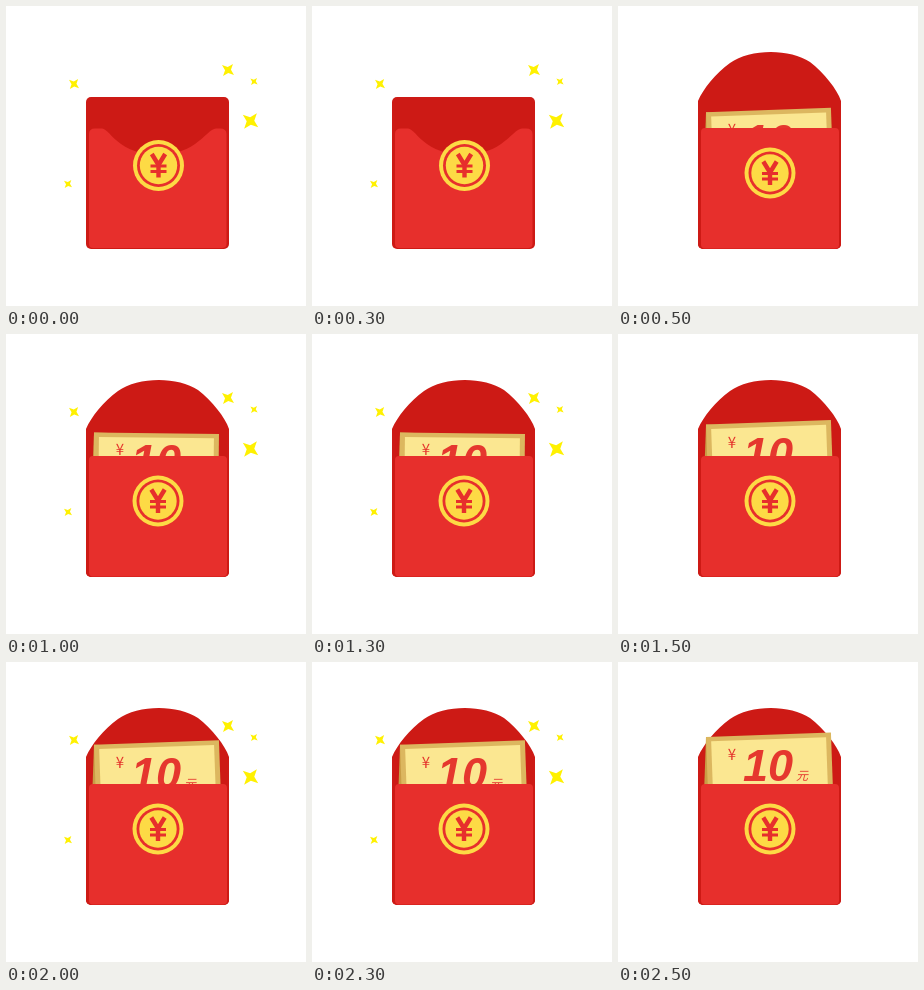
An HTML page with a canvas for the animation above (3 s loop, 300x300 px).

```html
<!DOCTYPE html>
<html>
<head>
<meta charset="utf-8">
<style>
  html, body { margin: 0; width: 100%; height: 100%; overflow: hidden; background: #fff; }
  canvas { display: block; }
</style>
</head>
<body>
<canvas id="stage" width="300" height="300"></canvas>
<script>
const ctx = document.getElementById('stage').getContext('2d');
const LOOP = 3000, STEP = 500;
const DARK = '#cd1a15', RED = '#e72f2c', GOLD = '#fdda45';
const SPARKLES = [[68, 78, 6.5], [222, 64, 7.8], [248, 75.5, 4.7], [244.5, 115, 10], [62, 178, 5.2]];

function fillRound(x, y, w, h, radius, color) {
  ctx.fillStyle = color;
  ctx.beginPath();
  ctx.roundRect(x, y, w, h, radius);
  ctx.fill();
}

function disc(x, y, r, color) {
  ctx.fillStyle = color;
  ctx.beginPath();
  ctx.arc(x, y, r, 0, Math.PI * 2);
  ctx.fill();
}

function label(text, x, y, font) {
  ctx.font = font;
  ctx.fillText(text, x, y);
}

function sparkle(x, y, r) {
  ctx.fillStyle = '#fff100';
  ctx.beginPath();
  for (let i = 0; i < 8; i++) {
    const angle = Math.PI * (i / 4 + 0.22);
    const reach = i % 2 ? r * 0.38 : r;
    ctx.lineTo(x + reach * Math.cos(angle), y + reach * Math.sin(angle));
  }
  ctx.closePath();
  ctx.fill();
}

function yenSign(x, y) {
  ctx.strokeStyle = RED;
  ctx.lineWidth = 4.4;
  ctx.beginPath();
  ctx.moveTo(x - 6.7, y - 11.5);
  ctx.lineTo(x, y - 0.5);
  ctx.lineTo(x + 6.7, y - 11.5);
  ctx.moveTo(x, y - 1);
  ctx.lineTo(x, y + 12);
  ctx.stroke();
  ctx.lineWidth = 3;
  ctx.beginPath();
  for (const dy of [0.5, 6]) {
    ctx.moveTo(x - 8, y + dy);
    ctx.lineTo(x + 8, y + dy);
  }
  ctx.stroke();
}

function coin(x, y) {
  disc(x, y, 25.5, GOLD);
  disc(x, y, 21.5, RED);
  disc(x, y, 18.7, GOLD);
  yenSign(x, y);
}

function openFlap() {
  ctx.fillStyle = DARK;
  ctx.beginPath();
  ctx.moveTo(80, 130);
  ctx.lineTo(80, 95);
  ctx.bezierCurveTo(85, 83, 98, 67, 112, 57);
  ctx.bezierCurveTo(132, 42.5, 172, 42.5, 192, 56);
  ctx.bezierCurveTo(206, 67, 219, 83, 223, 95);
  ctx.lineTo(223, 130);
  ctx.fill();
}

function bill(top, tilt) {
  ctx.save();
  ctx.translate(88, top);
  ctx.rotate(0.035);
  fillRound(0, 0, 124, 80, 0, '#c99d45');
  ctx.restore();

  ctx.save();
  ctx.translate(88, top);
  ctx.rotate(tilt);
  fillRound(0, 0, 125, 80, 0, '#dcb75f');
  fillRound(5, 4.5, 115, 75, 0, '#fbe791');
  ctx.restore();

  ctx.fillStyle = '#e5372e';
  ctx.textAlign = 'center';
  label('¥', 114, top + 23, '15px "Noto Sans CJK SC", "Noto Sans CJK", sans-serif');
  label('10', 150, top + 44, 'italic bold 45px "Liberation Sans", Arial, sans-serif');
  label('元', 184, top + 43, 'italic 12px "Noto Sans CJK SC", "Noto Sans CJK", sans-serif');
}

function closedEnvelope() {
  fillRound(80, 91, 143, 152, 5, DARK);
  ctx.fillStyle = RED;
  ctx.beginPath();
  ctx.moveTo(83, 128);
  ctx.quadraticCurveTo(83, 122.5, 89, 122.5);
  ctx.lineTo(96, 122.5);
  ctx.bezierCurveTo(101, 123, 105, 131, 115, 138);
  ctx.bezierCurveTo(137, 153, 167, 153, 189, 138);
  ctx.bezierCurveTo(199, 131, 205, 122.5, 210, 122.5);
  ctx.lineTo(214, 122.5);
  ctx.quadraticCurveTo(220.5, 122.5, 220.5, 128);
  ctx.lineTo(220.5, 238);
  ctx.quadraticCurveTo(220.5, 242, 216, 242);
  ctx.lineTo(87, 242);
  ctx.quadraticCurveTo(83, 242, 83, 238);
  ctx.fill();
  coin(152.5, 159.5);
}

function openEnvelope(step) {
  openFlap();
  fillRound(80, 110, 143, 133, 5, DARK);
  bill(114 - step * 7.8, step === 2 ? 0.012 : -0.036);
  fillRound(80, 124, 143, 119, [0, 0, 5, 5], DARK);
  fillRound(83, 122, 138, 120.5, 4, RED);
  coin(152, 167);
}

function draw(now) {
  const step = Math.floor((now % LOOP) / STEP);
  ctx.fillStyle = '#fff';
  ctx.fillRect(0, 0, 300, 300);
  if (step === 0) closedEnvelope();
  else openEnvelope(step);
  if (step % 2 === 0) SPARKLES.forEach(s => sparkle(...s));
}

let start;
function tick(now) {
  start ??= now;
  draw(now - start);
  requestAnimationFrame(tick);
}
draw(0);
requestAnimationFrame(tick);
</script>
</body>
</html>
```
